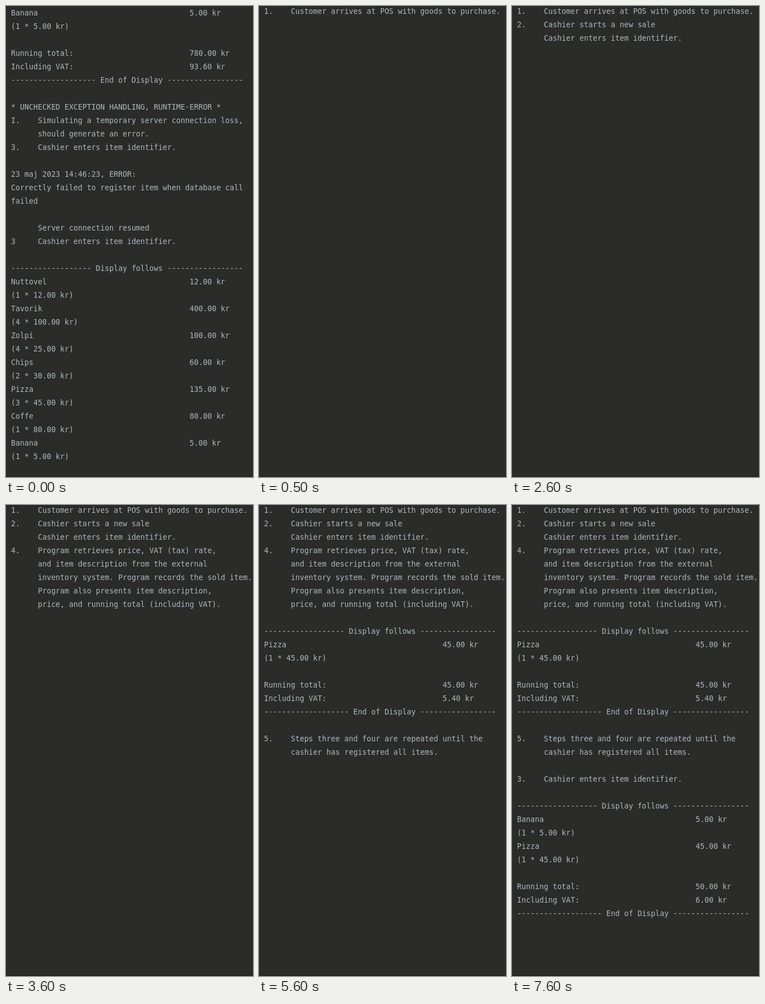
Write an HTML page that moves like this. It is 442x841 px and loops after 8000 ms.

```html
<!DOCTYPE html>
<html lang="en">
<head>
<meta charset="utf-8">
<title>Point of sale console</title>
<style>
  html, body { margin: 0; width: 100%; height: 100%; overflow: hidden; background: #2b2b29; }
  svg { display: block; }
  text {
    white-space: pre;
    font: 13.288px "DejaVu Sans Mono", "Noto Sans Mono", monospace;
    font-variant-ligatures: none;
    fill: #aeb8c2;
  }
</style>
</head>
<body>
<svg width="442" height="841">
  <g id="console"></g>
  <rect y="840" width="442" height="1" fill="#1d1d1c"/>
</svg>
<script>
const LOOP = 8000;
const LEFT = 9;
const LINE_HEIGHT = 24;
const output = document.getElementById('console');

const dashes = n => '-'.repeat(n);
const displayStart = `${dashes(18)} Display follows ${dashes(17)}`;
const displayEnd = `${dashes(19)} End of Display ${dashes(17)}`;
const step = (label, text) => label.padEnd(6) + text;
const amount = (label, value) => `${label.padEnd(40)}${value.toFixed(2)} kr`;
const item = (name, count, price) =>
  [amount(name, count * price), `(${count} * ${price.toFixed(2)} kr)`];
const totals = total =>
  ['', amount('Running total:', total), amount('Including VAT:', total * 0.12), displayEnd];
const enterItem = label => step(label, 'Cashier enters item identifier.');

const previousRun = [
  ...item('Banana', 1, 5),
  ...totals(780),
  '',
  '* UNCHECKED EXCEPTION HANDLING, RUNTIME-ERROR *',
  step('I.', 'Simulating a temporary server connection loss,'),
  step('', 'should generate an error.'),
  enterItem('3.'),
  '',
  '23 maj 2023 14:46:23, ERROR:',
  'Correctly failed to register item when database call',
  'failed',
  '',
  step('', 'Server connection resumed'),
  enterItem('3'),
  '',
  displayStart,
  ...item('Nuttovel', 1, 12),
  ...item('Tavorik', 4, 100),
  ...item('Zolpi', 4, 25),
  ...item('Chips', 2, 30),
  ...item('Pizza', 3, 45),
  ...item('Coffe', 1, 80),
  ...item('Banana', 1, 5)
];

// Each block is printed below the earlier ones at its time in ms.
const newRun = [
  [500, [step('1.', 'Customer arrives at POS with goods to purchase.')]],
  [1600, [step('2.', 'Cashier starts a new sale')]],
  [2600, [enterItem('')]],
  [3600, [
    step('4.', 'Program retrieves price, VAT (tax) rate,'),
    step('', 'and item description from the external'),
    step('', 'inventory system. Program records the sold item.'),
    step('', 'Program also presents item description,'),
    step('', 'price, and running total (including VAT).')
  ]],
  [4600, ['', displayStart, ...item('Pizza', 1, 45), ...totals(45)]],
  [5600, [
    '',
    step('5.', 'Steps three and four are repeated until the'),
    step('', 'cashier has registered all items.')
  ]],
  [6600, ['', enterItem('3.')]],
  [7600, ['', displayStart, ...item('Banana', 1, 5), ...item('Pizza', 1, 45), ...totals(50)]]
];

let shown = null;

function draw(time) {
  const scrolled = time < 400;
  const lines = scrolled
    ? previousRun
    : newRun.filter(([start]) => time >= start).flatMap(([, block]) => block);
  const firstBaseline = scrolled ? 17 : 14;
  const markup = lines
    .map((line, i) => `<text x="${LEFT}" y="${firstBaseline + i * LINE_HEIGHT}">${line}</text>`)
    .join('');
  if (markup === shown) return;
  output.innerHTML = markup;
  shown = markup;
}

function tick() {
  draw(performance.now() % LOOP);
  requestAnimationFrame(tick);
}
tick();
</script>
</body>
</html>
```
